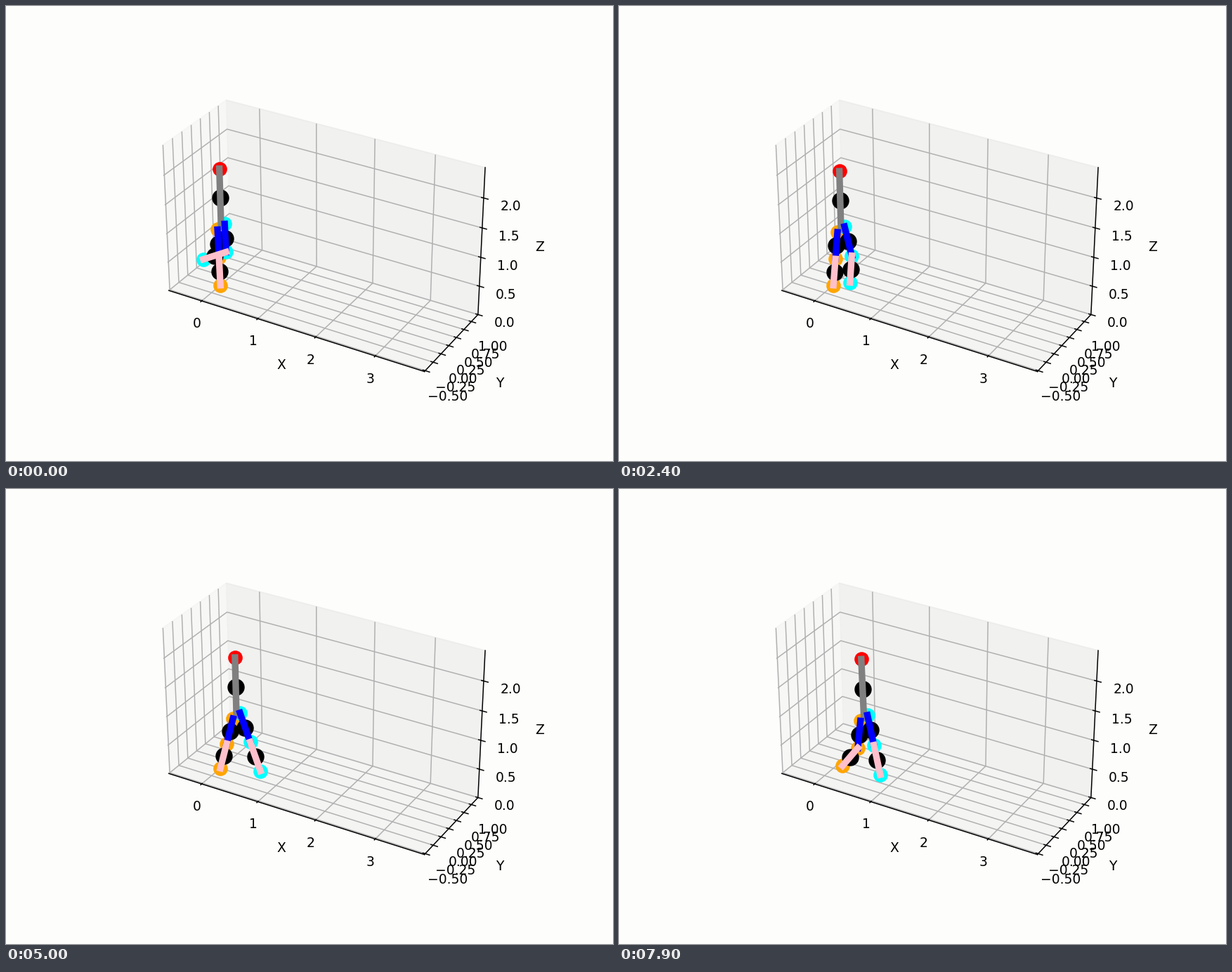
Write a matplotlib script that moves like this. It is 864x648 px and loops after 8 s.

```python
import numpy as np
import matplotlib.pyplot as plt
from matplotlib.animation import FuncAnimation

FRAMES, STEP = 80, 100
STRIKE = 6.5            # seconds until the swing foot lands
SEG = 0.495             # thigh and shank length
TORSO = 1.0
Y_LEFT, Y_MID, Y_RIGHT = 0.0, 0.1, 0.2
BG = "#fdfdfb"

# Pose keys: seconds, hip x, hip z
HIP_T = [0, 1.5, 3.2, 4.1, 5.0, 6.3, 6.5, 7.9]
HIP_X = [-0.02, 0.057, 0.147, 0.2, 0.255, 0.352, 0.37, 0.513]
HIP_Z = [0.982, 0.976, 0.968, 0.962, 0.957, 0.946, 0.938, 0.992]

# Swing leg angles from the vertical
SWING_T = [0, 1.5, 3.2, 4.1, 5.0, 6.5]
THIGH = [0.02, 0.086, 0.345, 0.35, 0.352, 0.353]
SHANK = [-1.03, -0.62, 0.28, 0.365, 0.36, 0.358]


def monotone(ts, vs):
    """Monotone cubic interpolation through the keys."""
    ts, vs = np.array(ts, float), np.array(vs, float)
    h = np.diff(ts)
    d = np.diff(vs) / h
    m = np.concatenate([d[:1], np.zeros(len(ts) - 2), d[-1:]])
    for i in range(1, len(ts) - 1):
        if d[i - 1] * d[i] > 0:
            w1, w2 = 2 * h[i] + h[i - 1], h[i] + 2 * h[i - 1]
            m[i] = (w1 + w2) / (w1 / d[i - 1] + w2 / d[i])

    def at(t):
        i = int(np.clip(np.searchsorted(ts, t) - 1, 0, len(h) - 1))
        u = (t - ts[i]) / h[i]
        return ((1 + 2 * u) * (1 - u) ** 2 * vs[i]
                + u * (1 - u) ** 2 * h[i] * m[i]
                + u * u * (3 - 2 * u) * vs[i + 1]
                + u * u * (u - 1) * h[i] * m[i + 1])
    return at


hip_x, hip_z = monotone(HIP_T, HIP_X), monotone(HIP_T, HIP_Z)
thigh, shank = monotone(SWING_T, THIGH), monotone(SWING_T, SHANK)


def hip_at(t):
    return np.array([hip_x(t), hip_z(t)])


def swing_leg(hip, a, b):
    knee = hip + SEG * np.array([np.sin(a), -np.cos(a)])
    return np.array([hip, knee, knee + SEG * np.array([np.sin(b), -np.cos(b)])])


def stance_leg(hip, foot):
    return np.array([hip, (hip + foot) / 2, foot])


LEFT_FOOT = np.zeros(2)
RIGHT_FOOT = np.array([0.722, 0.0])
off = hip_at(STRIKE)
LIFT = -np.arctan2(off[0], off[1])


def pose(t):
    """Joints (x, z) of the left leg, right leg and torso."""
    hip = hip_at(t)
    if t < STRIKE:
        left = stance_leg(hip, LEFT_FOOT)
        right = swing_leg(hip, thigh(t), shank(t))
        lean = 0.0
    else:
        u = (t - STRIKE) / (7.9 - STRIKE)
        left = swing_leg(hip, LIFT + u * (-0.118 - LIFT), LIFT + u * (-0.615 - LIFT))
        right = stance_leg(hip, RIGHT_FOOT)
        lean = -0.025 * u
    return left, right, np.array([hip, hip + [lean, TORSO]])


fig = plt.figure(figsize=(6.4, 4.8), dpi=135, facecolor=BG)
ax = fig.add_subplot(projection="3d", facecolor=BG)


def dots(color, size):
    return ax.plot([], [], [], "o", color=color, ms=size)[0]


def bar(color):
    return ax.plot([], [], [], color=color, lw=5)[0]


head = dots("red", 10)
left_joints = dots("orange", 10)
right_joints = dots("cyan", 10)
masses = dots("black", 12)
spine = bar("gray")
thighs = [bar("blue"), bar("blue")]
shanks = [bar("pink"), bar("pink")]

ax.set(xlim=(-0.6, 3.8), ylim=(-0.525, 1.225), zlim=(0, 2.5),
       xlabel="X", ylabel="Y", zlabel="Z")
ax.set_xticks(range(4))
ax.set_yticks(np.arange(-0.5, 1.01, 0.25))
ax.set_zticks(np.arange(0, 2.01, 0.5))
ax.set_box_aspect((4.4, 1.75, 2.5))


def place(line, pts, y):
    line.set_data_3d(pts[:, 0], np.broadcast_to(y, len(pts)), pts[:, 1])


def update(i):
    left, right, torso = pose(i * STEP / 1000)
    place(head, torso[1:], Y_MID)
    place(left_joints, left, Y_LEFT)
    place(right_joints, right, Y_RIGHT)
    mids = [(p[:-1] + p[1:]) / 2 for p in (left, right, torso)]
    place(masses, np.vstack(mids), [Y_LEFT] * 2 + [Y_RIGHT] * 2 + [Y_MID])
    place(spine, torso, Y_MID)
    for k, (leg, y) in enumerate([(left, Y_LEFT), (right, Y_RIGHT)]):
        place(thighs[k], leg[:2], y)
        place(shanks[k], leg[1:], y)
    return []


anim = FuncAnimation(fig, update, frames=FRAMES, interval=STEP,
                     repeat=True, repeat_delay=0, blit=False)
plt.show()
```
